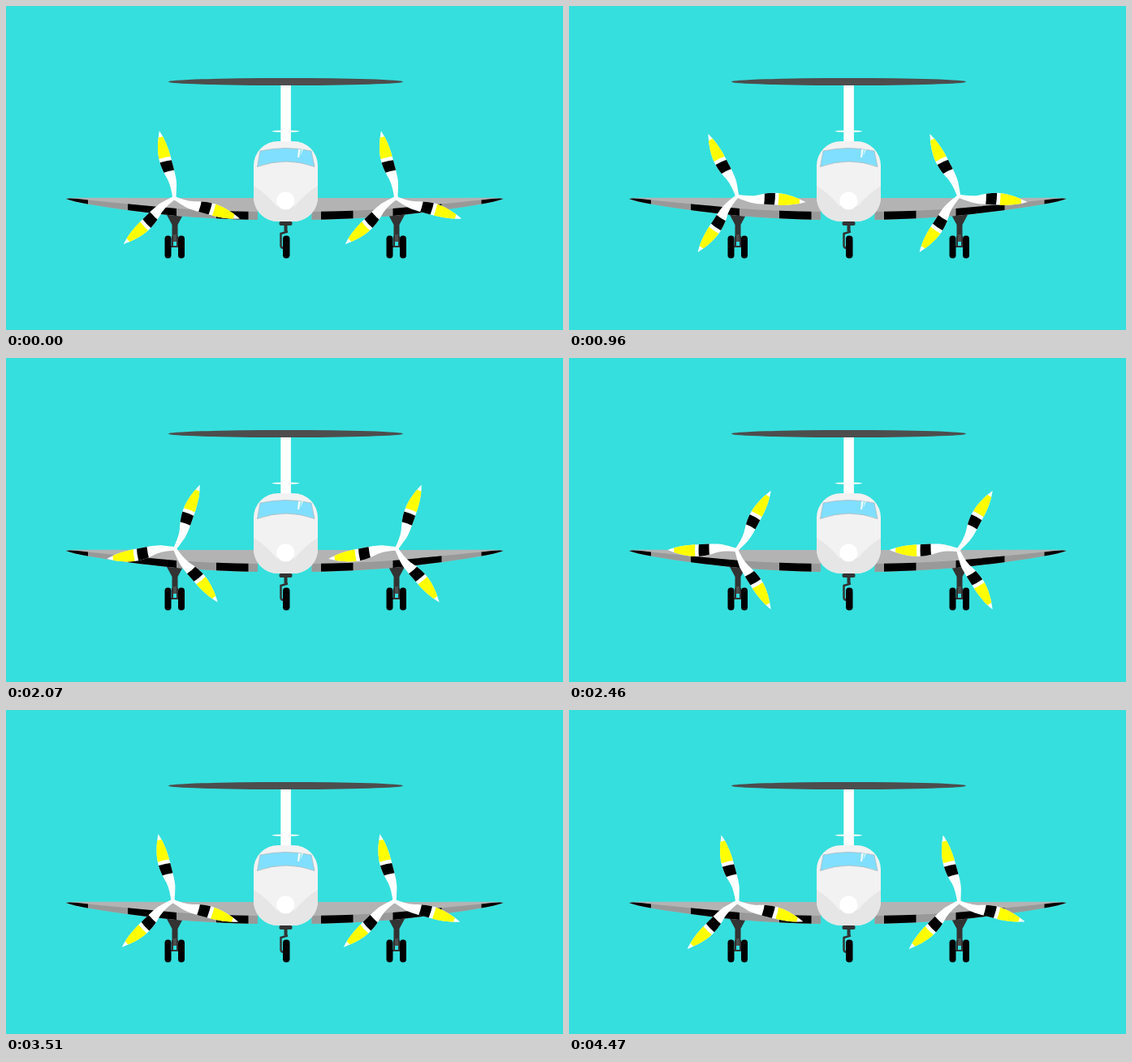
Animation of 686x400 px, one loop 4.5 s. Source, as an HTML page:

```html
<!DOCTYPE html>
<html lang="en">
<head>
<meta charset="utf-8">
<title>Propeller plane</title>
<style>
  html, body { margin: 0; width: 100%; height: 100%; overflow: hidden; background: #35dfdd; }
  svg { display: block; width: 100vw; height: 100vh; }
</style>
</head>
<body>
<svg viewBox="0 0 686 400">
  <defs>
    <path id="bladeShape" d="M0-84.7C4-75 6.5-62 6.8-48C7-38 8.5-22 6-14C4.5-8 3-3 2 1L-2 1C-1.5-8-1-16-3-24C-5-30-8-40-8-50C-8-62-4-75 0-84.7Z"/>
    <clipPath id="bladeClip"><use href="#bladeShape"/></clipPath>
    <g id="blade">
      <use href="#bladeShape" fill="#fff"/>
      <g clip-path="url(#bladeClip)">
        <path d="M-12-77H12V-50.5Q0-52-12-50.5Z" fill="#ff0"/>
        <path d="M-12-46Q0-47.5 12-46V-33.5Q0-34.5-12-32.5Z"/>
      </g>
    </g>
    <g id="prop">
      <use href="#blade"/>
      <use href="#blade" transform="rotate(120)"/>
      <use href="#blade" transform="rotate(240)"/>
      <circle r="2.6" fill="#fff"/>
    </g>

    <path id="strip" d="M74 238.2L101 239.5Q150 244.5 210 250Q258 253.5 310 254V264Q258 263 210 259Q150 253 101 244.5Q84 241.5 74 238.2Z"/>
    <clipPath id="stripClip"><use href="#strip"/></clipPath>
    <g id="wing">
      <path d="M74 238Q78 236.8 90 236.8L310 237V264Q258 263 210 259Q150 253 101 244.5Q84 241.5 74 238Z" fill="#b3b3b3"/>
      <use href="#strip" fill="#999"/>
      <path d="M74 238Q77 236.8 88 238L101 239.5V244.5Q84 241.5 74 238Z"/>
      <path d="M150 230H210V270H150ZM259 230H298.5V270H259Z" clip-path="url(#stripClip)"/>
    </g>

    <g id="gear">
      <path d="M197 256H219L211.500 270V284H204.500V270Z" fill="#333"/>
      <path d="M206 282H210V291H206Z" fill="#4d4d4d"/>
      <path d="M202 297H214M205 284V296M211 284V296" stroke="#333" stroke-width="2" fill="none"/>
      <rect x="195.500" y="283.500" width="8" height="28" rx="3.800"/>
      <rect x="212" y="283.500" width="8" height="28" rx="3.800"/>
    </g>
  </defs>

  <rect width="686" height="400" fill="#35dfdd"/>

  <rect x="338.300" y="96" width="12.600" height="76" fill="#fff"/>
  <ellipse cx="344.500" cy="154.600" rx="17" ry="1.200" fill="#fff"/>
  <ellipse cx="344.500" cy="93.500" rx="144.500" ry="4.500" fill="#4d4d4d"/>

  <use href="#gear"/>
  <use href="#gear" x="273"/>
  <use href="#wing"/>
  <use href="#wing" transform="translate(686.500) scale(-1 1)"/>

  <g fill="none" stroke="#333">
    <path d="M344.500 268V278" stroke-width="4"/>
    <path d="M347 278.500L338.500 281V296Q338.500 299 343 299" stroke-width="2.500"/>
  </g>
  <rect x="336.500" y="266" width="16" height="5" rx="2" fill="#333"/>
  <rect x="341" y="283.500" width="8.500" height="28" rx="4"/>

  <rect x="305" y="167" width="79" height="99" rx="30" fill="#f2f2f2"/>
  <path d="M305 222Q322 233 333 247H356Q367 233 384 222V236A30 30 0 0 1 354 266H335A30 30 0 0 1 305 236Z" fill="#e6e6e6"/>
  <circle cx="344.300" cy="240.500" r="11" fill="#fff"/>
  <path d="M313 179Q345 172 376 179L380 198.500Q345 185.500 309.500 198.500Z" fill="#80dfff" stroke="#a6b4ba" stroke-width=".7"/>
  <path d="M360 177L363 176.500L361 187L359 187ZM364.500 176.500L366 176.500L363 184L362.500 184Z" fill="#fff" opacity=".85"/>

  <use class="spin" href="#prop"/>
  <use class="spin" href="#prop"/>
</svg>
<script>
const LOOP = 4500, STEP = 30, START = 107.5;
const props = [...document.querySelectorAll('.spin')];

// Spin-up: [step, turned degrees, degrees per step]
const spin = [
  [0, 0, 60], [18, 1080, 60.5], [32, 2027.5, 72], [55, 3757.2, 81.5],
  [82, 6162.5, 96.5], [101, 8107.3, 107.5], [133, 11581.9, 108.6], [149, 13319.1, 108.6]
];

// Cubic Hermite between the keys
function turned(n) {
  let i = 0;
  while (i < spin.length - 2 && n >= spin[i + 1][0]) i++;
  const [n0, a0, v0] = spin[i], [n1, a1, v1] = spin[i + 1];
  const d = n1 - n0, u = (n - n0) / d, w = u * u * (3 - 2 * u);
  return a0 + (a1 - a0) * w
    + d * u * (1 - u) * (v0 * (1 - u) - v1 * u);
}

function draw(time) {
  const angle = START + turned(Math.floor((time % LOOP) / STEP));
  // The blades sit slightly off the pivot, so the hub wobbles.
  props.forEach((p, i) => p.setAttribute('transform',
    `translate(${206.7 + 273 * i} 235.8) rotate(${(angle % 360).toFixed(2)}) translate(.93 -.84)`));
}

const t0 = performance.now();
function tick() {
  draw(performance.now() - t0);
  requestAnimationFrame(tick);
}
draw(0);
requestAnimationFrame(tick);
</script>
</body>
</html>
```
